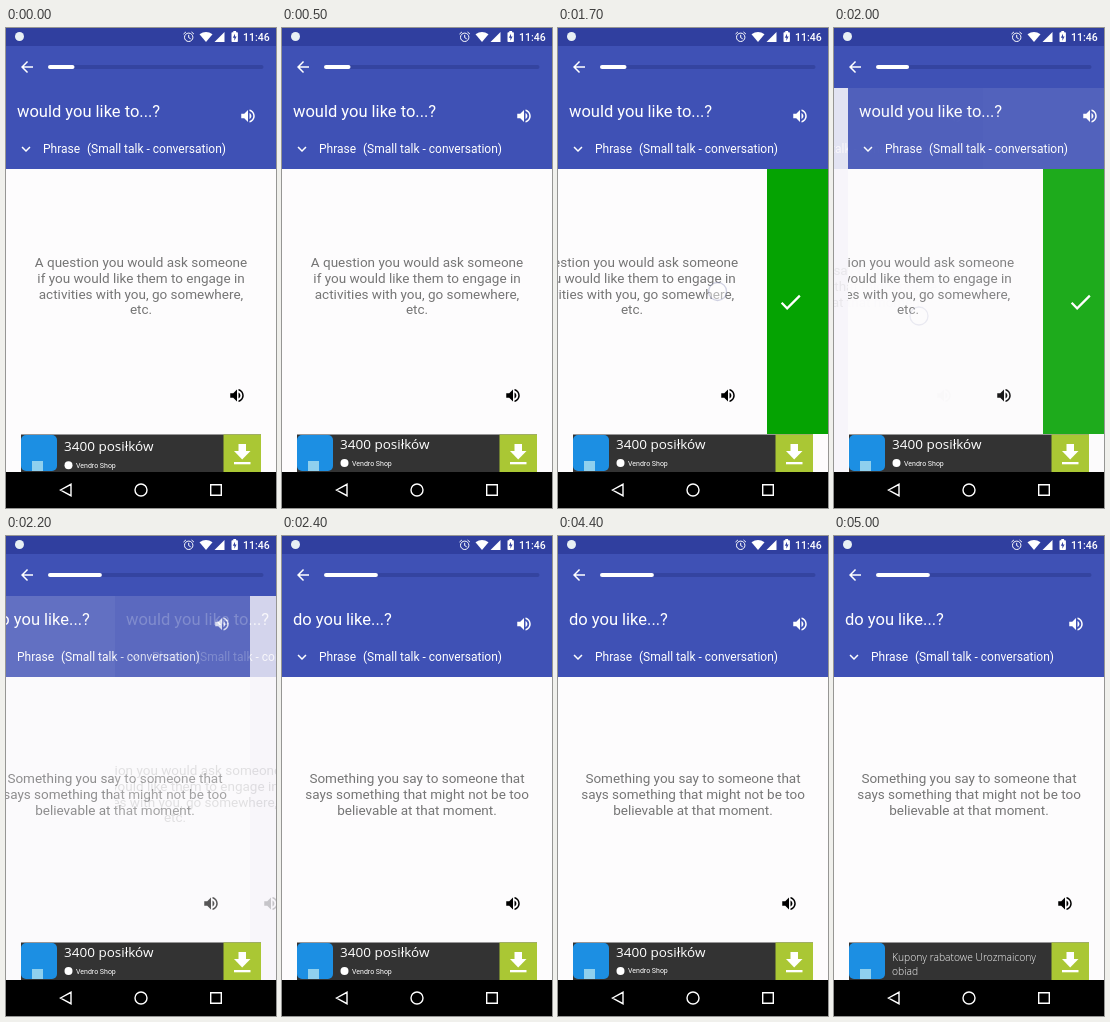
An HTML page with a canvas for the animation above (5.1 s loop, 270 by 480 pixels).

```html
<!DOCTYPE html>
<html lang="en">
<head>
<meta charset="utf-8">
<title>Phrase cards</title>
<style>
html, body { margin: 0; width: 100%; height: 100%; overflow: hidden; background: #fdfcfd; }
canvas { display: block; width: 270px; height: 480px; }
</style>
</head>
<body>
<canvas id="stage"></canvas>
<script>
const W = 270, H = 480, LOOP = 5100;
const BLUE = '#3f51b5', GREEN = '#05a302', PAPER = '#fdfcfd', WINDOW = '#f7f5fa';
const ROBOTO = 'Roboto, sans-serif', OPEN = '"Open Sans", sans-serif';
const REVEAL = 75;
const dpr = window.devicePixelRatio || 1;

const ICON = {
  back: 'M20 11H7.83l5.59-5.59L12 4l-8 8 8 8 1.41-1.41L7.83 13H20v-2z',
  more: 'M16.59 8.59L12 13.17 7.41 8.59 6 10l6 6 6-6z',
  check: 'M9 16.17L4.83 12l-1.42 1.41L9 19 21 7l-1.41-1.41z',
  sound: 'M3 9v6h4l5 5V4L7 9H3zm13.5 3c0-1.77-1.02-3.29-2.5-4.03v8.05c1.48-.73 2.5-2.25 2.5-4.02z' +
    'M14 3.23v2.06c2.89.86 5 3.54 5 6.71s-2.11 5.85-5 6.71v2.06c4.01-.91 7-4.49 7-8.77s-2.99-7.86-7-8.77z',
  bolt: 'M13 1L6 14h5v9l7-13h-5z'
};
for (const k in ICON) ICON[k] = new Path2D(ICON[k]);

const CARDS = [
  { title: 'would you like to...?', y: 239, lines: [
    'A question you would ask someone', 'if you would like them to engage in',
    'activities with you, go somewhere,', 'etc.'] },
  { title: 'do you like...?', y: 247, lines: [
    'Something you say to someone that', 'says something that might not be too',
    'believable at that moment.'] }
];

function makeLayer(canvas) {
  canvas.width = W * dpr;
  canvas.height = H * dpr;
  const c = canvas.getContext('2d');
  c.scale(dpr, dpr);
  return c;
}
const ctx = makeLayer(document.getElementById('stage'));
const layer = makeLayer(document.createElement('canvas'));

const clamp = v => Math.max(0, Math.min(1, v));
const span = (t, a, b) => clamp((t - a) / (b - a));
const smooth = v => v * v * (3 - 2 * v);
const cosine = v => (1 - Math.cos(Math.PI * v)) / 2;
const mix = (a, b, v) => a + (b - a) * v;

function rect(c, color, x, y, w, h, r = 0) {
  c.fillStyle = color;
  c.beginPath();
  c.roundRect(x, y, w, h, r);
  c.fill();
}
function poly(c, color, ...pts) {
  c.fillStyle = color;
  c.beginPath();
  for (let i = 0; i < pts.length; i += 2) c.lineTo(pts[i], pts[i + 1]);
  c.closePath();
  c.fill();
}
function disc(c, color, x, y, r) {
  c.fillStyle = color;
  c.beginPath();
  c.arc(x, y, r, 0, 7);
  c.fill();
}
function text(c, str, x, y, font, color, align = 'left') {
  c.font = font;
  c.fillStyle = color;
  c.textAlign = align;
  c.fillText(str, x, y);
}
function icon(c, path, x, y, size, color) {
  c.save();
  c.translate(x - size / 2, y - size / 2);
  c.scale(size / 24, size / 24);
  c.fillStyle = color;
  c.fill(path);
  c.restore();
}

// Page = phrase header plus a card that slides left over a green button.
function drawPage(c, card, swipe) {
  c.clearRect(0, 0, W, H);
  rect(c, PAPER, 0, 60, W, 384);
  rect(c, BLUE, 0, 60, W, 81);
  text(c, card.title, 11, 89, '16.5px ' + ROBOTO, '#fff');
  icon(c, ICON.sound, 242, 88, 18, '#fff');
  icon(c, ICON.more, 20, 121, 18, '#fff');
  text(c, 'Phrase', 37, 125, '12px ' + ROBOTO, '#fff');
  text(c, '(Small talk - conversation)', 81, 125, '12px ' + ROBOTO, '#fff');

  if (swipe > 0) {
    c.save();
    c.beginPath();
    c.rect(W - swipe, 141, swipe, 265);
    c.clip();
    rect(c, GREEN, W - swipe, 141, swipe, 265);
    icon(c, ICON.check, W - REVEAL / 2, 274, 27, '#fff');
    c.restore();
  }
  card.lines.forEach((line, i) =>
    text(c, line, 135 - swipe, card.y + i * 15.82, '13.5px ' + ROBOTO, '#757575', 'center'));
  icon(c, ICON.sound, 231 - swipe, 367.5, 18, '#000');
}

function putPage(card, swipe, x, alpha) {
  drawPage(layer, card, swipe);
  ctx.globalAlpha = alpha;
  ctx.drawImage(layer.canvas, Math.round(x), 0, W, H);
  ctx.globalAlpha = 1;
}

function drawBars(progress) {
  rect(ctx, '#303f9f', 0, 0, W, 18);
  disc(ctx, '#e8f0f4', 13.5, 8.5, 4.5);

  ctx.strokeStyle = '#fff';
  ctx.lineWidth = 1;
  ctx.beginPath();
  ctx.arc(182.7, 9.3, 4.2, 0, 7);
  ctx.moveTo(182.7, 6.8);
  ctx.lineTo(182.7, 9.6);
  ctx.lineTo(184.7, 10.8);
  ctx.moveTo(177.5, 6);
  ctx.lineTo(179.9, 4);
  ctx.moveTo(185.5, 4);
  ctx.lineTo(187.9, 6);
  ctx.stroke();

  ctx.fillStyle = '#fff';
  ctx.beginPath();
  ctx.moveTo(193.5, 6.3);
  ctx.quadraticCurveTo(200, 1.7, 206.5, 6.3);
  ctx.lineTo(200, 14);
  ctx.fill();
  poly(ctx, '#fff', 208.5, 14, 218.5, 14, 218.5, 4);
  rect(ctx, '#fff', 225.5, 4.2, 6.4, 9.8, 0.8);
  rect(ctx, '#fff', 227.3, 3, 2.8, 2);
  icon(ctx, ICON.bolt, 228.7, 9.2, 7.5, '#303f9f');
  text(ctx, '11:46', 263.6, 12.8, '500 10.5px ' + ROBOTO, '#fff', 'right');

  rect(ctx, BLUE, 0, 18, W, 42);
  icon(ctx, ICON.back, 21, 39, 18, '#fff');
  rect(ctx, '#3444a0', 42, 37, 215.5, 4, 2);
  rect(ctx, '#fff', 42, 37, 215.5 * progress, 4, 2);
}

function drawNav() {
  rect(ctx, '#000', 0, 444, W, 36);
  ctx.strokeStyle = '#fff';
  ctx.lineWidth = 1.4;
  ctx.beginPath();
  ctx.moveTo(54.5, 462);
  ctx.lineTo(65, 456.3);
  ctx.lineTo(65, 467.7);
  ctx.closePath();
  ctx.moveTo(141, 462);
  ctx.arc(135, 462, 6, 0, Math.PI * 2);
  ctx.rect(204.7, 456.7, 10.6, 10.6);
  ctx.stroke();
}

function drawAd(t) {
  rect(ctx, '#333', 15, 406.5, 240, 37.5);
  rect(ctx, '#1c8fe3', 15, 407, 36, 36, 5);
  rect(ctx, '#8fd0ee', 26, 433, 11, 10);

  rect(ctx, '#aac734', 217.5, 406.5, 37.5, 37.5);
  rect(ctx, '#fff', 232.5, 416, 7.5, 8);
  poly(ctx, '#fff', 228, 423, 244.5, 423, 236.2, 431.5);
  rect(ctx, '#fff', 228, 434, 16.5, 2.3);

  const enter = 1 - Math.pow(1 - span(t, 0, 600), 2);
  const leave = smooth(span(t, 4400, 4700));
  const next = smooth(span(t, 4600, 5050));
  ctx.save();
  ctx.beginPath();
  ctx.rect(56, 407, 160, 37);
  ctx.clip();
  if (leave < 1) {
    ctx.globalAlpha = 1 - leave;
    const dy = 2.3 * (1 - enter) - 12 * leave;
    text(ctx, '3400 posiłków', 58, 421 + dy, '13.5px ' + OPEN, '#fff');
    disc(ctx, '#fff', 62.5, 435 + dy, 4);
    text(ctx, 'Vendro Shop', 70, 437.5 + dy, '7px ' + ROBOTO, '#fff');
  }
  if (next > 0) {
    ctx.globalAlpha = next;
    const dy = 12 * (1 - next);
    text(ctx, 'Kupony rabatowe Urozmaicony', 58, 425 + dy, '300 10.3px ' + OPEN, '#fff');
    text(ctx, 'obiad', 58, 438.7 + dy, '300 10.3px ' + OPEN, '#fff');
  }
  ctx.restore();
}

function drawTouch(x, y, alpha) {
  if (alpha <= 0) return;
  ctx.globalAlpha = alpha;
  disc(ctx, 'rgba(255,255,255,.45)', x, y, 9);
  ctx.strokeStyle = 'rgba(120,125,175,.35)';
  ctx.lineWidth = 1.3;
  ctx.beginPath();
  ctx.arc(x, y, 9, 0, 7);
  ctx.stroke();
  ctx.globalAlpha = 1;
}

function draw(t) {
  const drag = smooth(span(t, 1430, 1980));
  const fx = mix(231, 85, drag), fy = mix(240, 288, drag);
  const swipe = Math.round(Math.max(0, Math.min(REVEAL, 221 - fx)));
  const p = cosine(span(t, 1916, 2316));
  const half = W / 2;

  rect(ctx, WINDOW, 0, 0, W, H);
  if (p > 0) putPage(CARDS[1], 0, (p - 1) * half, p);
  if (p < 1) putPage(CARDS[0], swipe, p * half, 1 - p);
  drawBars(mix(0.123, 0.25, cosine(span(t, 1905, 2200))));
  drawAd(t);
  drawNav();
  drawTouch(fx, fy, span(t, 1390, 1410) * mix(1, 0.4, span(t, 1930, 2000)) * (1 - span(t, 2000, 2090)));
}

const start = performance.now();
function tick() {
  draw((performance.now() - start) % LOOP);
  requestAnimationFrame(tick);
}
tick();
</script>
</body>
</html>
```
